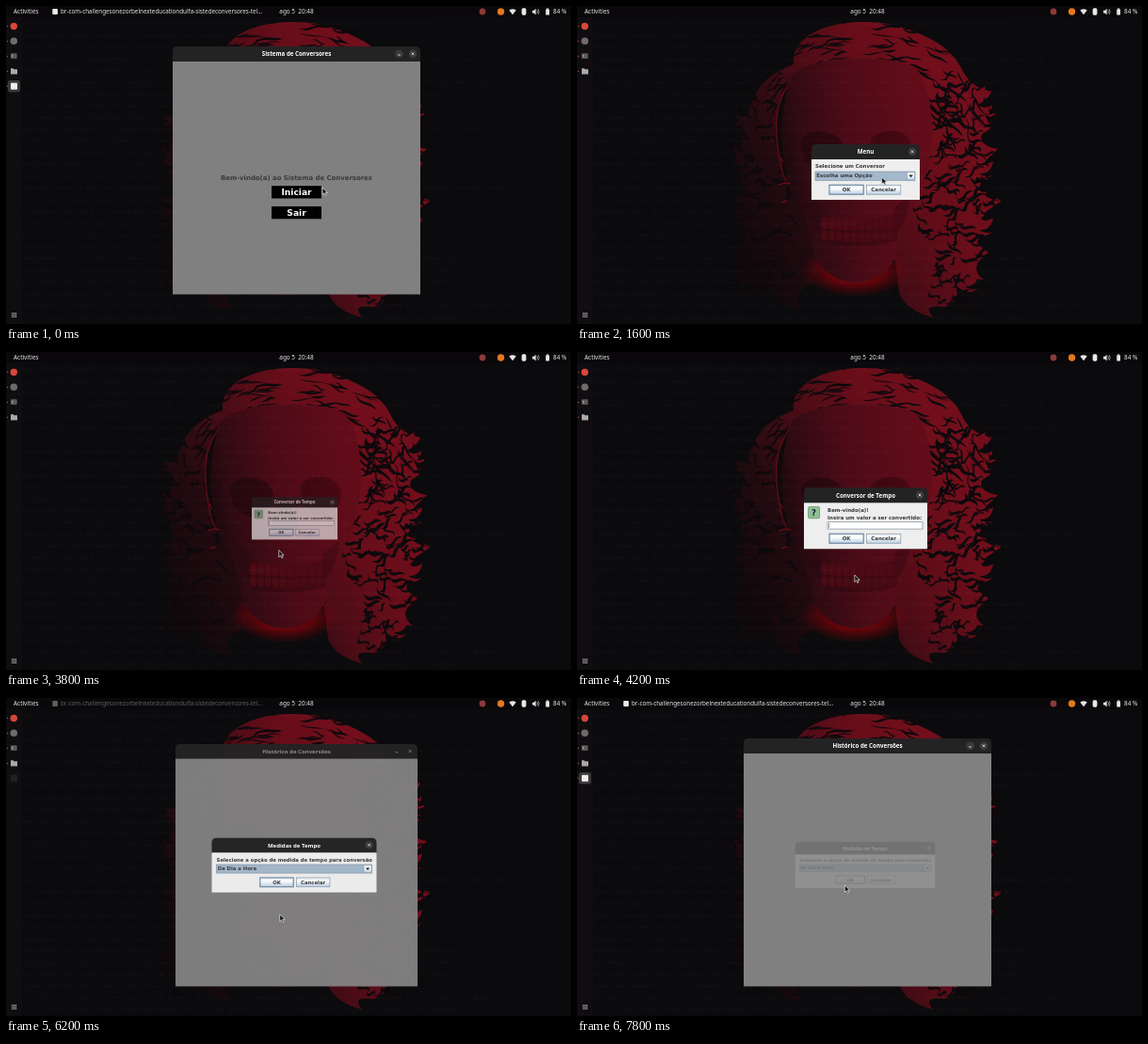
Recreate the animation shown at these times as an HTML page. Size 600 by 338 pixels, loop 8000 ms.

```html
<!DOCTYPE html>
<html lang="pt">
<head>
<meta charset="utf-8">
<title>Sistema de Conversores</title>
<style>
html, body { margin: 0; width: 100%; height: 100%; overflow: hidden; background: #0b0a0c; }
svg { display: block; width: 100%; height: 100%; }
text { white-space: pre; }
.ui { font-family: "Noto Sans", "Open Sans", sans-serif; font-size: 6.4px; fill: #e6e5e6; }
.title { font-family: "Noto Sans", "Open Sans", sans-serif; font-size: 6.2px; font-weight: 700; fill: #fff; text-anchor: middle; }
.java { font-family: "DejaVu Sans", sans-serif; font-size: 5.45px; font-weight: 700; fill: #3a3a3a; }
.mid { text-anchor: middle; }
.code { font-family: "DejaVu Sans Mono", monospace; font-size: 5px; fill: #d8b0b0; opacity: .05; }
.blur .title { fill: #929092; }
.blur .dot { fill: none; }
.blur .glyph { stroke: #929092; }
</style>
</head>
<body>
<svg id="stage" viewBox="0 0 600 338" xmlns="http://www.w3.org/2000/svg"></svg>
<script>
const LOOP = 8000;
let seed = 11;
const rnd = () => (seed = (seed * 16807) % 2147483647) / 2147483647;
const between = (a, b) => a + (b - a) * rnd();
const times = (n, f) => Array.from({ length: n }, (_, i) => f(i)).join('');
const rect = (x, y, w, h, fill, more = '') => `<rect x="${x}" y="${y}" width="${w}" height="${h}" fill="${fill}" ${more}/>`;
const circle = (x, y, r, fill, more = '') => `<circle cx="${x}" cy="${y}" r="${r}" fill="${fill}" ${more}/>`;
const path = (d, fill, more = '') => `<path d="${d}" fill="${fill}" ${more}/>`;
const text = (x, y, cls, s, more = '') => `<text x="${x}" y="${y}" class="${cls}" ${more}>${s}</text>`;
const gradient = (id, coords, stops) => `<linearGradient id="${id}" ${coords}>` +
  stops.map(([o, c]) => `<stop offset="${o}" stop-color="${c}"/>`).join('') + '</linearGradient>';

// Wallpaper
const HAIR = 'M300 17C270 18 245 27 235 42Q229 50 230 62C208 70 190 84 184 106Q180 125 166 124Q180 134 173 150' +
  'Q162 166 176 182Q180 200 170 222Q180 236 172 258Q168 280 184 286Q205 292 210 310Q222 322 240 322Q225 306 248 296' +
  'L262 270L338 270L342 305Q350 324 378 331Q366 316 390 320Q408 314 402 296Q416 288 432 291Q414 278 437 262' +
  'Q420 252 424 240Q428 220 450 208Q430 204 424 190Q420 176 447 152Q425 148 430 136Q446 128 444 114Q424 120 422 104' +
  'Q438 100 440 90Q418 88 408 66C398 46 378 34 350 24Q328 16 300 17Z';
const FACE = 'M230 72C250 54 336 48 362 68C382 100 380 155 368 186Q362 206 348 216L341 258Q330 293 297 294' +
  'Q262 293 249 258L242 222Q226 208 223 180C214 145 216 100 230 72Z';

// A tapered dark S-shaped gap between locks, heading along the angle in degrees.
function gap(x, y, angle, length, width, bend) {
  const n = v => v.toFixed(1), h = length / 2;
  return path(`M0 0Q${n(h / 2)} ${n(bend)} ${n(h)} 0T${n(length)} 0` +
    `Q${n(h * 1.5)} ${n(width - bend)} ${n(h)} ${n(width)}T0 0Z`, '#0d090c',
    `transform="translate(${n(x)} ${n(y)}) rotate(${n(angle)})"`);
}
function topGap() {
  const a = between(-2.6, -.35), r = between(.66, 1.02), side = a < -1.6 ? -1 : 1;
  return gap(302 + Math.cos(a) * 130 * r, 168 + Math.sin(a) * 152 * r,
    a * 180 / Math.PI + side * between(72, 98), between(14, 34), between(1.2, 2.8), between(-4, 4));
}
function sideGap(i) {
  const right = i % 3 > 0;
  const y = between(70, 315), inner = 62 + 10 * Math.sin(y / 40);
  const x = 302 + (right ? 1 : -1) * between(inner, 138);
  const angle = right ? between(-50, 60) : between(120, 230);
  return gap(x, y, angle, between(9, 22), between(2, 4.6), between(3, 7) * (right ? 1 : -1));
}
function curl(i) {
  const right = i % 2, d = right ? 1 : -1, k = i >> 1;
  const x = right ? 416 - Math.max(0, k - 7) * 5 + 8 * Math.sin(k * 2) : 187 + 5 * Math.sin(k * 2);
  const y = right ? 82 + k * 20 : 112 + k * 17;
  return path(`M${x} ${y}q${d * 8} 10 ${d * 18} 3q${d * -2} 14 ${d * -15} 13q${d * 7} 5 ${d * 14} 2q${d * -9} 10 ${d * -24} -4z`, 'url(#hair)');
}
const letters = 'abcdefghilmnoprstuvx ()=;.{}  ';
const codeRow = i => text(18, 20 + i * 12.5, 'code',
  times(Math.floor(between(90, 175)), () => letters[Math.floor(rnd() * letters.length)]));

const teeth = times(10, i => {
  const x = 259 + i * 7.8, sag = 5 - Math.abs(i - 4.5);
  return rect(x, 224 + sag * .5, 7.2, 13, '#4c0a14', 'rx="2.5"') + rect(x + .4, 238 + sag * .5, 6.6, 11, '#480a13', 'rx="2.5"');
});
const wallpaper = `
  ${rect(0, 0, 600, 338, '#0b0a0c')}
  ${path(HAIR, 'url(#hair)')}${times(22, curl)}
  ${times(95, topGap)}${times(250, sideGap)}
  <ellipse cx="296" cy="281" rx="58" ry="28" fill="url(#glow)"/>
  ${path('M226 84Q208 105 214 150L222 185L232 120Z', '#10080c')}
  <path d="M228 78Q208 102 212 140T222 186" fill="none" stroke="#6a0c17" stroke-width="1"/>
  ${path(FACE, 'url(#face)')}
  <g fill="url(#socket)">
    <path d="M238 142Q248 130 268 135Q286 140 283 157Q276 174 259 175Q238 171 238 142Z"/>
    <path d="M312 142Q320 131 340 133Q357 138 356 156Q350 174 334 174Q315 172 312 142Z"/>
    <path d="M296 152Q286 170 281 188Q288 197 297 191Q306 197 313 188Q306 168 296 152Z"/>
  </g>
  <g fill="#20070d" opacity=".3">
    <path d="M241 203Q254 206 262 218L256 240Q243 225 241 203Z"/>
    <path d="M354 201Q344 207 336 216L340 242Q352 226 354 201Z"/>
    <path d="M252 222Q296 235 343 220L340 249Q298 262 260 250Z"/>
  </g>
  ${teeth}
  <path d="M306 191q7 6 14 2M214 190l7-2 6 1M217 209l6-2M357 184l6 1M358 197l4 2M368 212l8-2M425 197l10 2M444 205l6 2M216 161l3 5" fill="none" stroke="#9c0c17" stroke-width=".8"/>
  ${times(26, codeRow)}`;

// Desktop panels
const bright = '#e8e7e8';
const panels = `
  ${rect(0, 12, 17, 326, '#100d11')}${rect(0, 0, 600, 12, '#0a080a')}
  ${text(8, 8.3, 'ui', 'Activities')}${text(308.5, 8.3, 'ui mid', 'ago 5  20:48')}${text(581, 8.3, 'ui', '84 %')}
  ${circle(506, 6, 3.4, '#8b3a38')}
  ${circle(525.5, 6, 3.7, '#e2791d')}
  ${path('M534.3 4.5Q538 1.8 541.7 4.5L538 9.3Z', bright)}
  ${rect(547.6, 2.3, 4.8, 7.4, bright, 'rx="1.6"')}
  ${path('M559 4.8h1.6l2-2v6.6l-2-2H559z', bright)}
  <path d="M563.8 4.2q1.5 1.8 0 3.6M565 3q2.4 3 0 6" fill="none" stroke="${bright}" stroke-width=".6"/>
  ${rect(573.2, 3.2, 3.8, 6.4, bright, 'rx=".6"')}${rect(574.3, 2.3, 1.6, 1, bright)}
  ${times(4, i => circle(1.5, 21.5 + i * 16, .7, '#a8522f'))}
  ${circle(8.3, 21.5, 3.7, '#d8473a')}
  ${circle(8.3, 37.3, 3.8, '#6d6b6e')}
  ${rect(4.9, 50.3, 6.8, 5.8, '#59585b', 'rx="1"')}${path('M6 52l1.4 1-1.4 1', 'none', 'stroke="#ddd" stroke-width=".6"')}
  ${path('M5 66.2h2.6l.8 1H12v5.3H5z', '#a9a8aa')}
  ${times(9, i => rect(6.1 + i % 3 * 1.9, 326 + Math.floor(i / 3) * 1.9, 1.2, 1.2, '#c9c8ca'))}
  <g id="dockApp">
    ${rect(2, 79, 13, 12.6, '#3b393c', 'rx="2.4"')}${circle(1.5, 85.3, .7, '#a8522f')}
    ${rect(5, 81.8, 7, 7, '#eeedea', 'rx=".8"')}
  </g>
  <g id="appTitle">
    ${rect(49.3, 3, 5.6, 6, '#eceae8', 'rx=".8"')}
    ${text(58, 8.3, 'ui', 'br-com-challengesonezorbelnexteducationdulfa-sistedeconversores-tel…', 'style="font-size:6.28px"')}
  </g>`;

// Windows
const cross = (x, y) => `${circle(x, y, 4.4, '#3b393b', 'class="dot"')}` +
  `<path d="M${x - 1.4} ${y - 1.4}l2.8 2.8m0-2.8l-2.8 2.8" class="glyph" stroke="#f2f2f2" stroke-width=".8"/>`;
const minus = (x, y) => `${circle(x, y, 4.4, '#3b393b', 'class="dot"')}` +
  `<path d="M${x - 1.5} ${y + 1.2}h3" class="glyph" stroke="#f2f2f2" stroke-width=".8"/>`;

function frame(id, x, y, w, h, title, body, fill = '#eeeeee') {
  return `<g id="${id}">
    ${path(`M${x} ${y + 17}v-12q0-5 5-5h${w - 10}q5 0 5 5v12z`, '#242324')}
    ${rect(x, y + 16, w, h - 16, fill)}
    ${text(x + w / 2, y + 10.2, 'title', title)}${cross(x + w - 8, y + 7.8)}${body}</g>`;
}
const button = (x, y, w, label, focus) =>
  rect(x, y, w, 10, 'url(#metal)', `stroke="${focus ? '#5b7590' : '#7a8a99'}" stroke-width="${focus ? 1 : .6}"`) +
  text(x + w / 2, y + 7, 'java mid', label);
const buttons = (x, y) => button(x, y, 36.2, 'OK', true) + button(x + 39.4, y, 36.4, 'Cancelar');
const combo = (x, y, w, label, id) =>
  rect(x, y, w, 9.3, '#a3b8cc', 'stroke="#7a8a99" stroke-width=".6"') +
  rect(x + w - 8.6, y + .3, 8.3, 8.7, 'url(#metal)', 'stroke="#7a8a99" stroke-width=".5"') +
  path(`M${x + w - 6.7} ${y + 3.6}h4.6l-2.3 2.6z`, '#222') +
  text(x + 1.2, y + 6.4, 'java', label, `id="${id}"`);

const bigFrame = (id, title, body) => frame(id, 177, 43, 263, 263.5, title, minus(417.5, 50.8) + body, '#818081');
const bigButton = (id, y, label) => rect(282, y, 53, 13.3, '#000', `id="${id}"`) +
  text(308.5, y + 9.9, 'java mid', label, 'style="font-size:9.1px;fill:#fff"');

const options = ['Escolha uma Opção', 'Conversor de Moeda', 'Conversor de Temperatura', 'Conversor de Tempo'];
const LIST_Y = 185.8, ROW = 8.1;
const list = `<g id="list">${rect(253, LIST_Y, 106, ROW * 4, '#eee', 'stroke="#7a8a99" stroke-width=".6"')}
  ${rect(253.3, LIST_Y, 105.4, ROW, '#a3b8cc', 'id="hover"')}
  ${options.map((s, i) => text(254.2, LIST_Y + 5.9 + i * ROW, 'java', s)).join('')}</g>`;

const windows =
  bigFrame('welcome', 'Sistema de Conversores',
    text(308.5, 185.3, 'java mid', 'Bem-vindo(a) ao Sistema de Conversores', 'style="font-size:6.92px"') +
    bigButton('start', 191.2, 'Iniciar') + bigButton('quit', 213, 'Sair')) +
  bigFrame('history', 'Histórico de Conversões', '') +
  frame('menu', 249, 147, 115, 59, 'Menu',
    text(253, 172.4, 'java', 'Selecione um Conversor') + combo(253, 176, 106, options[0], 'choice') + buttons(268, 190.2)) +
  list +
  frame('value', 241, 144.3, 131, 65, 'Conversor de Tempo',
    rect(245.6, 164.4, 12, 12.4, '#8fbf95', 'rx="1" stroke="#5d8a68" stroke-width=".7"') +
    text(251.6, 173.7, 'java mid', '?', 'style="font-size:8.6px;fill:#123"') +
    text(266, 170, 'java', 'Bem-vindo(a)!') + text(266, 178.1, 'java', 'Insira um valor a ser convertido:') +
    rect(266, 180.7, 101, 7.4, '#fff', 'stroke="#7a8a99" stroke-width=".7"') +
    text(267.2, 186.5, 'java', '', 'id="typed" style="font-weight:400"') +
    rect(267, 181.8, .5, 5.2, '#333', 'id="caret"') + buttons(268, 193.2)) +
  frame('units', 216.5, 148, 179, 59.3, 'Medidas de Tempo',
    text(221.7, 173.8, 'java', 'Selecione a opção de medida de tempo para conversão') +
    combo(221.7, 177, 168.6, 'De Dia a Hora', 'unit') + buttons(269, 191.3));

const stage = document.getElementById('stage');
stage.innerHTML = `<defs>
  ${gradient('hair', 'gradientUnits="userSpaceOnUse" x1="165" y1="240" x2="400" y2="120"',
    [[0, '#10080b'], [.27, '#210a0f'], [.59, '#500c16'], [.78, '#660d19'], [1, '#720e1b']])}
  ${gradient('face', 'gradientUnits="userSpaceOnUse" x1="218" y1="190" x2="372" y2="165"',
    [[0, '#16090d'], [.16, '#2f0a12'], [.5, '#4c0b16'], [1, '#620c1a']])}
  ${gradient('socket', 'gradientUnits="userSpaceOnUse" x1="238" y1="0" x2="356" y2="0"',
    [[0, '#22080d'], [.5, '#36070f'], [1, '#4a0813']])}
  ${gradient('metal', 'x1="0" y1="0" x2="0" y2="1"', [[0, '#dde8f3'], [.35, '#ffffff'], [1, '#b8cfe5']])}
  <radialGradient id="glow"><stop offset=".35" stop-color="#7c0209"/><stop offset="1" stop-color="#7c0209" stop-opacity="0"/></radialGradient></defs>
  ${wallpaper}${panels}${windows}
  <path id="cursor" d="M0 0V7.4L1.8 5.8 3 8.4 4.3 7.8 3.1 5.3H5.4Z" fill="#111" stroke="#f4f4f4" stroke-width=".65"/>`;

const el = {};
stage.querySelectorAll('[id]').forEach(n => el[n.id] = n);

// Timing
const START_PRESS = 195, WELCOME_CLOSE = 560, MENU_OPEN = 1000, LIST_OPEN = 1780, LIST_PICK = 2590;
const MENU_CLOSE = 3600, VALUE_OPEN = 3760, VALUE_CLOSE = 5860, UNITS_OPEN = 6066, UNITS_CLOSE = 7708;
const clamp = v => Math.min(1, Math.max(0, v));
const outExpo = p => p >= 1 ? 1 : 1 - 2 ** (-10 * p);
const outQuad = p => 1 - (1 - p) ** 2;
const smooth = p => p * p * (3 - 2 * p);

const route = [
  [0, 336, 193], [120, 336, 193], [START_PRESS, 325.5, 195.6], [1000, 325.5, 195.6], [1500, 323.7, 182], [1850, 323.7, 182],
  [2450, 320.7, 212.6], [3000, 320.7, 212.6], [3400, 287, 196], [MENU_CLOSE, 287, 196], [4100, 294.8, 237],
  [5700, 294.8, 237], [6150, 290.7, 230], [6650, 290.7, 230], [7450, 284.3, 199], [LOOP, 284.3, 199]];

function pointer(t) {
  const i = Math.max(1, route.findIndex(k => k[0] > t));
  const [a, b] = [route[i - 1], route[i]];
  const p = smooth((t - a[0]) / (b[0] - a[0]));
  return [a[1] + (b[1] - a[1]) * p, a[2] + (b[2] - a[2]) * p];
}
function show(node, visible) { node.setAttribute('visibility', visible ? 'visible' : 'hidden'); }

function place(node, t, open, close, cx, cy, closeY = cy) {
  const grow = outExpo(clamp((t - open) / 250)), leave = outQuad(clamp((t - close) / 150));
  const s = (.05 + .95 * grow) * (1 - .2 * leave), y = t < close ? cy : closeY;
  show(node, t >= open && leave < 1);
  node.setAttribute('transform', `translate(${cx} ${y}) scale(${s}) translate(${-cx} ${-y})`);
  node.setAttribute('opacity', grow * (1 - leave));
}

function draw(t) {
  const [x, y] = pointer(t);
  el.cursor.setAttribute('transform', `translate(${x} ${y})`);

  place(el.welcome, t, -999, WELCOME_CLOSE, 308.5, 306.5, 174.7);
  el.start.setAttribute('fill', t >= START_PRESS ? '#b8cfe5' : '#000');
  place(el.menu, t, MENU_OPEN, MENU_CLOSE, 306.5, 176.5);
  place(el.value, t, VALUE_OPEN, VALUE_CLOSE, 306.5, 176.8);
  place(el.history, t, UNITS_OPEN, 9999, 308.5, 306.5);
  place(el.units, t, UNITS_OPEN, UNITS_CLOSE, 306, 177.6);
  el.history.setAttribute('class', t < UNITS_CLOSE ? 'blur' : '');

  show(el.list, t >= LIST_OPEN && t < LIST_PICK);
  const row = Math.min(3, Math.max(0, Math.floor((y - LIST_Y) / ROW)));
  el.hover.setAttribute('y', LIST_Y + row * ROW);
  el.choice.textContent = t < LIST_PICK ? options[0] : options[3];

  const typed = t < 4700 ? '' : t < 4900 ? '1' : '10';
  el.typed.textContent = typed;
  el.caret.setAttribute('x', 267 + typed.length * 3.5);

  const title = t < WELCOME_CLOSE ? 1 : t < 3000 ? .25 * clamp((1100 - t) / 250) :
    t < 6300 ? .38 * clamp((t - UNITS_OPEN) / 130) : .38 + .62 * clamp((t - 6300) / 150);
  el.appTitle.setAttribute('opacity', title);
  el.dockApp.setAttribute('opacity', t < 3000 ? 1 - clamp((t - WELCOME_CLOSE) / 180) : clamp((t - 6180) / 240));
}

const origin = performance.now();
function tick() {
  draw((performance.now() - origin) % LOOP);
  requestAnimationFrame(tick);
}
tick();
</script>
</body>
</html>
```
